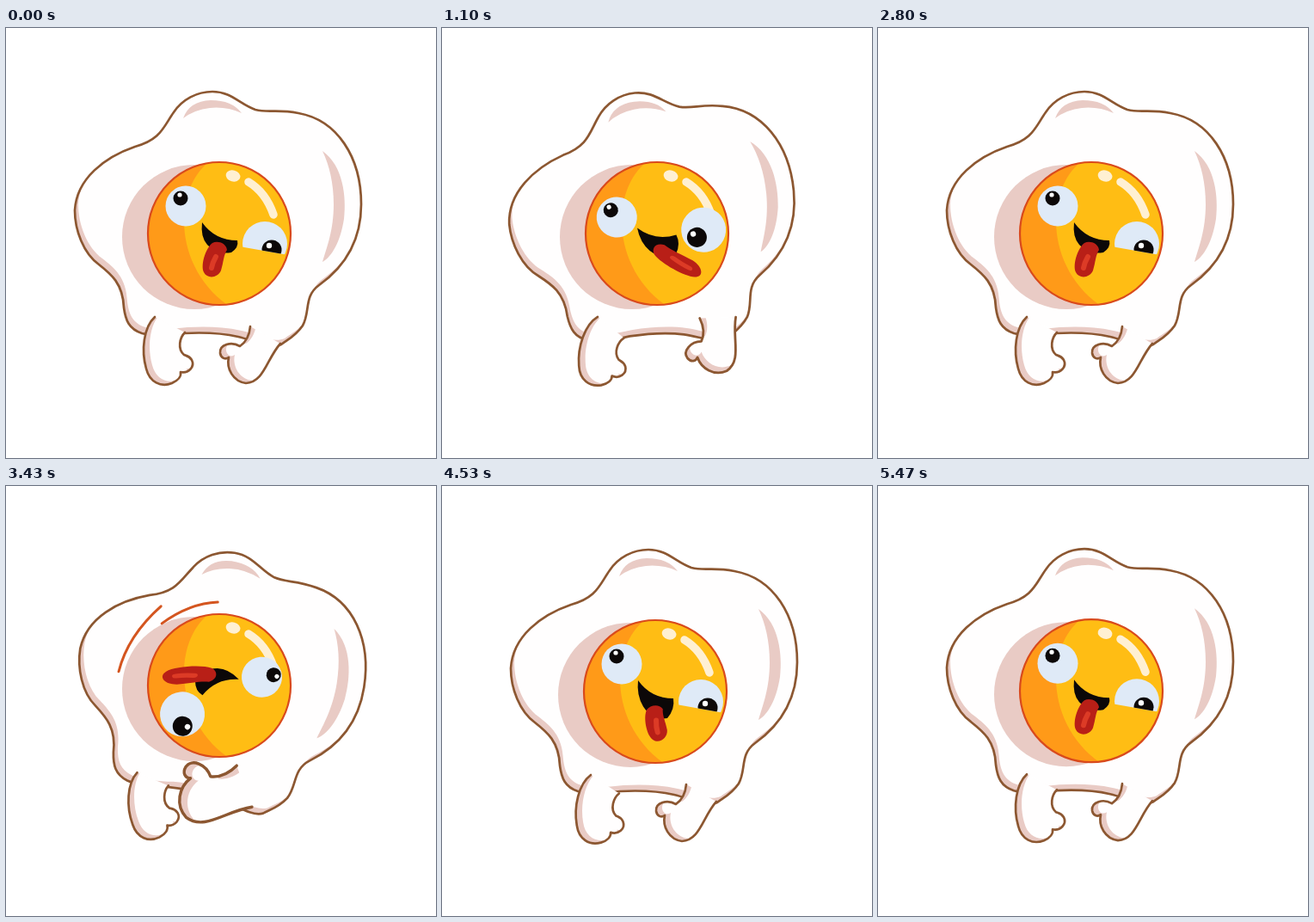
Write an HTML page that moves like this. It is 500 px wide and 500 px high and loops after 5510 ms.

```html
<!DOCTYPE html>
<html lang="en">
<head>
<meta charset="utf-8">
<title>Dancing egg</title>
<style>
  html, body { margin: 0; width: 100%; height: 100%; overflow: hidden; background: #fff; }
  svg { display: block; width: 100vw; height: 100vh; }
  .pink { fill: #e9cbc5; }
  .white { fill: #fffefe; }
  .line { fill: none; stroke: #8c5731; stroke-width: 2.7; stroke-linecap: round; stroke-linejoin: round; }
  .eye { fill: #dfeaf7; }
  .pupil { fill: #0c0808; }
  .shine { fill: #fff; }
  .glow { fill: #fff0d2; }
  .arc { fill: none; stroke: #fff0d2; stroke-width: 9.5; stroke-linecap: round; }
  .speed { fill: none; stroke: #d4551f; stroke-width: 3; stroke-linecap: round; }
</style>
</head>
<body>
<svg viewBox="0 0 500 500">
  <defs>
    <clipPath id="yolkClip"><circle cx="248" cy="239" r="83"/></clipPath>
    <clipPath id="lidClip"><rect id="lid" x="265" y="210" width="75" height="49" transform="rotate(10 301 251)"/></clipPath>
  </defs>

  <g id="body">
    <g id="white"></g>
    <path class="pink" d="M206 105Q213 85 238 84Q263 84 274 99Q256 91 237 93Q219 95 206 105Z"/>
    <path class="pink" d="M368 143C392 160 396 196 393 222C389 248 379 266 368 272C373 255 381 235 381 205C381 180 376 160 368 143Z"/>
  </g>

  <g id="yolk">
    <circle class="pink" cx="219" cy="243" r="84"/>
    <circle cx="248" cy="239" r="83" fill="#ffbd14"/>
    <path clip-path="url(#yolkClip)" fill="#ff9a18" d="M244 150C192 180 192 280 262 325H150V150Z"/>
    <circle cx="248" cy="239" r="83" fill="none" stroke="#d94a1c" stroke-width="2.2"/>
    <ellipse class="glow" cx="264" cy="172" rx="8.5" ry="6.5" transform="rotate(15 264 172)"/>
    <path class="arc" d="M282 179Q302 191 311 217"/>
    <g id="face">
      <path id="mouth" class="pupil"/>
      <g id="tongue">
        <path fill="#b81f17" d="M240 250C232 256 226 276 230 284C234 292 246 291 250 282C253 272 253 264 257 258C256 250 246 247 240 250Z"/>
        <path fill="none" stroke="#dc3b26" stroke-width="6" stroke-linecap="round" d="M244 266Q240 273 239 279"/>
      </g>
      <circle class="eye" cx="209" cy="207" r="23.5"/>
      <g id="pupilL"><circle class="pupil" r="8.5"/><circle class="shine" cx="-1" cy="-4" r="2.6"/></g>
      <g clip-path="url(#lidClip)">
        <circle class="eye" cx="301" cy="251" r="26"/>
        <g id="pupilR"><circle class="pupil" r="11.5"/><circle class="shine" cx="-3" cy="-5" r="3.2"/></g>
      </g>
    </g>
  </g>

  <g id="speed">
    <path class="speed" d="M131 216C138 188 153 164 180 140"/>
    <path class="speed" d="M181 160C200 146 222 136 246 135"/>
  </g>

  <g id="limbs"><g id="legL"></g><g id="legR"></g></g>
</svg>
<script>
const PERIOD = 2755;
const HOP_START = 1770;
const HOP_TIME = (PERIOD - HOP_START) / 3;
const $ = id => document.getElementById(id);
const set = (id, name, value) => $(id).setAttribute(name, value);

// White shape with an outline; the pink rim is what a shifted copy leaves uncovered.
function addShaded(id, d, dx, dy) {
  $(id).innerHTML = `
    <clipPath id="${id}Clip"><path d="${d}"/></clipPath>
    <path class="white" d="${d}"/>
    <g clip-path="url(#${id}Clip)">
      <path class="pink" fill-rule="evenodd" d="M-50 -50H550V550H-50Z${d}Z" transform="translate(${dx} ${dy})"/>
    </g>
    <path class="line" d="${d}"/>`;
}

addShaded('white', 'M240 74C262 74 272 89 290 95C305 99 315 94 340 99C385 107 413 150 413 205C413 250 392 279 364 299' +
  'C346 312 354 330 345 346C337 358 328 362 320 368C306 374 288 363 270 359C248 354 226 354 207 355C190 357 172 359 158 355' +
  'C143 350 139 340 137 325C136 297 122 286 108 275C90 262 80 235 80 212C82 175 115 150 150 138C180 130 183 115 195 98C205 83 222 74 240 74Z', 4, -7);
addShaded('legL', 'M173 336C160 348 157 375 163 396C167 412 180 418 193 413C200 410 204 405 203 400C212 402 220 394 216 386C213 381 209 381 207 380C199 373 202 360 208 354', 7, -4);
addShaded('legR', 'M284 347C283 358 278 366 272 370C262 364 248 368 249 378C250 384 255 386 259 383C256 396 264 411 279 413C300 412 303 385 319 367', 7, -3);

function ramp(t, from, to) {
  const p = Math.min(1, Math.max(0, (t - from) / (to - from)));
  return p * p * (3 - 2 * p);
}

// Rises from a to b, holds until c, falls until d.
const pulse = (t, a, b, c, d) => ramp(t, a, b) - ramp(t, c, d);

const pivoted = (x, y, turn) => `rotate(${turn} ${x} ${y})`;

function draw(time) {
  const t = time % PERIOD;

  // The dance: wind up, kick the yolk round, rebound, then hop while laughing.
  const windup = pulse(t, 60, 420, 430, 540);
  const kick = pulse(t, 500, 665, 770, 1050);
  const rebound = pulse(t, 800, 1080, 1170, 1480);
  const stomp = pulse(t, 1130, 1240, 1260, 1450);
  const laugh = pulse(t, 1450, 1770, 1840, 2600);
  const dizzy = pulse(t, 500, 610, 1200, 1450);
  const fling = pulse(t, 520, 660, 1120, 1400);
  const hop = t < HOP_START ? 0 : Math.sin(Math.PI * (t - HOP_START) / HOP_TIME) ** 2;
  const spin = 360 * (1 - (1 - Math.min(1, Math.max(0, (t - 550) / 800))) ** 2.6);

  const bob = 5 * windup + 7 * stomp - 6 * hop;
  const sway = `translate(0 ${bob + 3 * kick}) rotate(${9 * kick - 3 * windup - 5.5 * rebound} 248 239)`;
  set('body', 'transform', sway);
  set('limbs', 'transform', sway);

  const turnL = 4 * windup - 13.5 * kick + 17 * rebound + 6 * laugh * (1 + hop);
  const turnR = 31 * kick - 16 * windup - 26 * rebound - 9 * laugh * hop;
  set('legL', 'transform', `translate(${-5 * kick - rebound} ${8 * kick - 7 * rebound}) ${pivoted(173, 336, turnL)}`);
  set('legR', 'transform', `translate(${6 * rebound - 3 * kick} ${-29 * kick - 5 * rebound}) ${pivoted(284, 347, turnR)}
    translate(284 347) scale(${1 + .27 * kick + .04 * rebound}) translate(-284 -347)`);

  set('yolk', 'transform', `translate(${2 * rebound} ${bob - 7 * kick})`);
  set('face', 'transform', pivoted(248, 239, spin));

  const drop = 9 * (laugh + .3 * kick + .8 * rebound);
  set('mouth', 'd', `M228 226Q243 247 269 247Q271 ${255 + drop / 2} 262 ${261 + drop}Q245 ${264 + drop} 234 ${252 + drop / 2}Q226 243 228 226Z`);
  const tongueTurn = -60 * fling - 28 * laugh * (1 - hop);
  set('tongue', 'transform', `translate(0 ${drop * .7}) ${pivoted(247, 256, tongueTurn)}
    translate(247 256) rotate(16) scale(${1 - .15 * fling} ${1 + .5 * fling}) rotate(-16) translate(-247 -256)`);

  set('pupilL', 'transform', `translate(${203 - 4.7 * kick + 1.8 * rebound} ${198 - rebound})`);
  set('pupilR', 'transform', `translate(${309 + 2.6 * kick - 18 * rebound} ${258 - 16 * kick - rebound})`);
  set('lid', 'height', 49 + 24 * dizzy);

  set('speed', 'visibility', t >= 600 && t < 810 ? 'visible' : 'hidden');
  set('speed', 'transform', pivoted(248, 239, (t - 675) * .12));
}

const start = performance.now();
function tick() {
  draw(performance.now() - start);
  requestAnimationFrame(tick);
}
tick();
</script>
</body>
</html>
```
